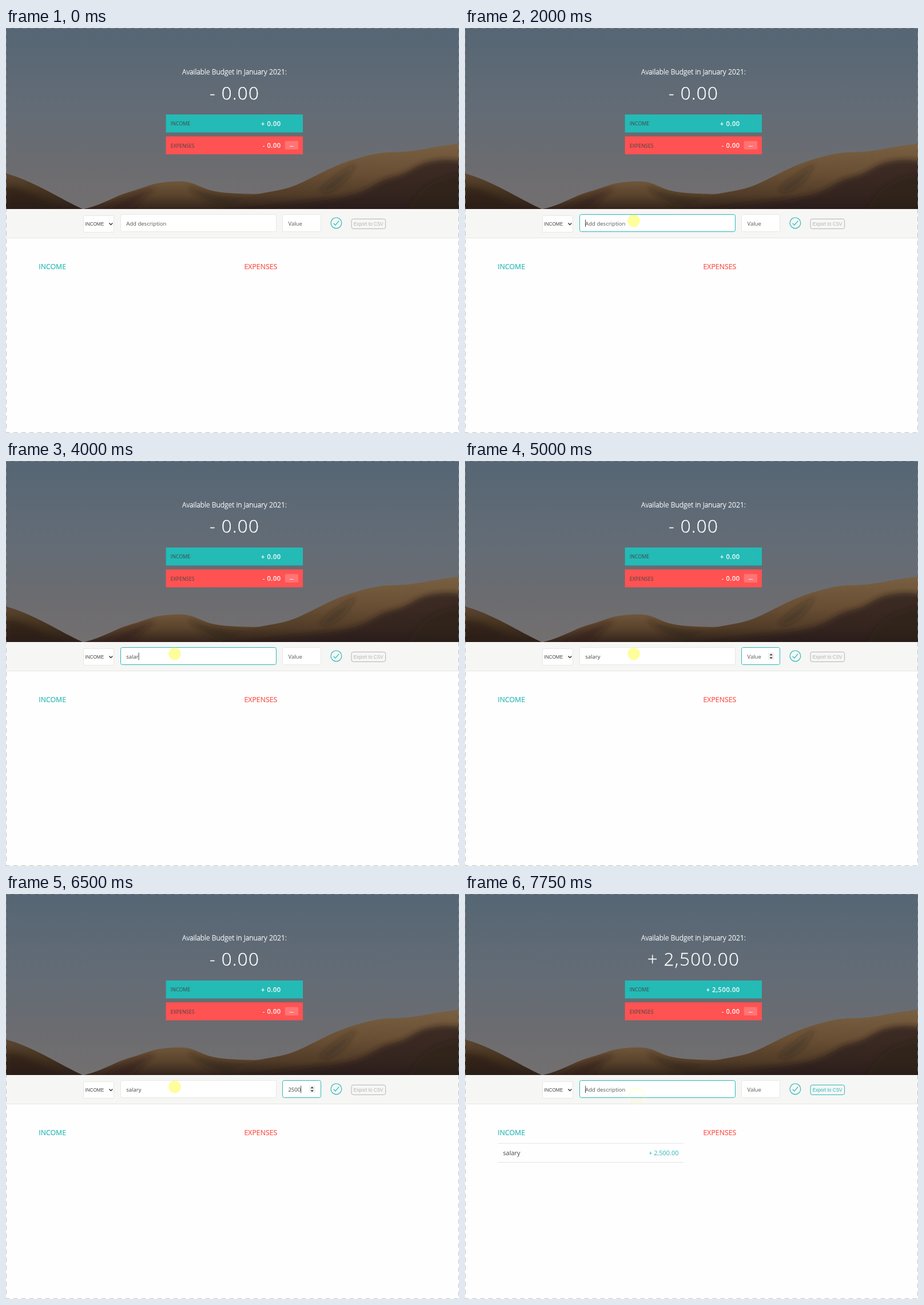
An HTML page for the animation above (8 s loop, 792 by 707 pixels).

```html
<!DOCTYPE html>
<html lang="en">
<head>
<meta charset="utf-8">
<title>Budget</title>
<style>
  html, body { margin: 0; width: 100%; height: 100%; overflow: hidden; background: #fefefe; }
  svg { display: block; width: 792px; height: 707px; }
  text { font-family: "Open Sans", sans-serif; font-size: 9.56px; fill: #444; white-space: pre; }
  .ui { font-family: "Liberation Sans", Arial, sans-serif; font-size: 8.2px; }
  .light { font-weight: 300; fill: #fff; text-anchor: middle; stroke: #fff; stroke-width: .3; }
  .title { font-size: 12.3px; }
  .big { font-size: 31.4px; letter-spacing: 1.37px; }
  .label { font-size: 8.88px; }
  .sum { font-size: 10.93px; letter-spacing: .68px; fill: #fff; text-anchor: end; stroke: #fff; stroke-width: .35; }
  .head { font-size: 12.35px; stroke-width: .2; }
  .row { font-size: 10.93px; }
  .teal { fill: #28b9b5; }
  .red { fill: #ff5049; }
  .head.teal { stroke: #28b9b5; }
  .head.red { stroke: #ff5049; }
  .field { fill: #fff; stroke: #e7e7e7; }
  .field.on { stroke: #28b9b5; }
  .hint { fill: #555; }
  .caret { stroke: #333; stroke-width: .9; }
  #export rect { fill: none; stroke: #b4b4b4; }
  #export text { fill: #b4b4b4; }
  #export.on rect { stroke: #28b9b5; }
  #export.on text { fill: #28b9b5; }
  .rule { stroke: #e4e4e4; }
</style>
</head>
<body>
<svg viewBox="0 0 792 707">
  <defs>
    <linearGradient id="sky" x1="0" y1="0" x2="0" y2="1">
      <stop offset="0" stop-color="#566674"/>
      <stop offset=".45" stop-color="#636c76"/>
      <stop offset=".75" stop-color="#6b6c70"/>
      <stop offset="1" stop-color="#736f70"/>
    </linearGradient>
    <linearGradient id="leftHill" x1="0" y1="0" x2="0" y2="1">
      <stop offset="0" stop-color="#5b4632"/>
      <stop offset=".5" stop-color="#45331f"/>
      <stop offset="1" stop-color="#2b1f1a"/>
    </linearGradient>
    <linearGradient id="midHill" x1="0" y1="0" x2="0" y2="1">
      <stop offset="0" stop-color="#6f563a"/>
      <stop offset=".5" stop-color="#5a432c"/>
      <stop offset="1" stop-color="#33241c"/>
    </linearGradient>
    <linearGradient id="rightHill" x1="0" y1="0" x2="0" y2="1">
      <stop offset="0" stop-color="#796042"/>
      <stop offset=".45" stop-color="#694f34"/>
      <stop offset=".78" stop-color="#523c28"/>
      <stop offset="1" stop-color="#2c1f19"/>
    </linearGradient>
    <filter id="soft" x="-20%" y="-40%" width="140%" height="180%"><feGaussianBlur stdDeviation="4"/></filter>
    <path id="left" d="M0 254C20 259 45 270 70 283S112 306 134 316H0Z"/>
    <path id="mid" d="M136 316C155 312 175 303 192 295S222 285 238 279S268 269 295 268S328 272 345 279S380 288 405 289S440 290 470 288V316Z"/>
    <path id="right" d="M376 316C400 306 420 294 440 290S485 283 505 275S550 253 572 243S615 227 640 221S685 218 708 215S760 205 792 202V316Z"/>
    <clipPath id="leftClip"><use href="#left"/></clipPath>
    <clipPath id="midClip"><use href="#mid"/></clipPath>
    <clipPath id="rightClip"><use href="#right"/></clipPath>
  </defs>

  <rect width="792" height="707" fill="#fefefe"/>
  <rect width="792" height="316" fill="url(#sky)"/>
  <use href="#left" fill="url(#leftHill)"/>
  <g clip-path="url(#leftClip)">
    <path d="M0 278C35 278 55 296 95 318H0Z" fill="#2a1e19" opacity=".6" filter="url(#soft)"/>
  </g>
  <use href="#mid" fill="url(#midHill)"/>
  <g clip-path="url(#midClip)" fill="#2a1e19" filter="url(#soft)">
    <path d="M318 276C345 292 400 294 470 302V320H385C360 304 335 296 318 276Z" opacity=".5"/>
    <path d="M185 309C215 288 240 284 262 280C240 294 230 308 215 320H170Z" opacity=".45"/>
  </g>
  <use href="#right" fill="url(#rightHill)"/>
  <g clip-path="url(#rightClip)" fill="#291c18" filter="url(#soft)">
    <path d="M410 322C500 306 560 302 600 292S650 265 676 260S715 239 738 234S770 229 800 232V325H410Z" opacity=".72"/>
    <path d="M548 284C566 264 590 248 612 237C600 258 590 276 560 288Z" opacity=".28"/>
    <path d="M700 325C715 285 740 262 800 252V325Z" opacity=".5"/>
  </g>

  <text class="light title" x="399.5" y="81">Available Budget in January 2021:</text>
  <text class="light big" id="total" x="399.5" y="125">- 0.00</text>
  <rect x="279.6" y="151" width="239.4" height="31.3" fill="#24bab6"/>
  <rect x="279.6" y="189.2" width="239.4" height="31.3" fill="#ff5252"/>
  <text class="label" x="287.8" y="170.3">INCOME</text>
  <text class="label" x="287.8" y="208.5">EXPENSES</text>
  <text class="sum" id="income" x="480.8" y="171">+ 0.00</text>
  <text class="sum" x="480.8" y="209.2">- 0.00</text>
  <rect x="487.7" y="197.3" width="23.3" height="14.6" rx="1.5" fill="#fff" fill-opacity=".2"/>
  <text class="light" x="499.3" y="208" style="font-size:7.5px;font-weight:400">---</text>

  <rect y="316" width="792" height="50.5" fill="#f6f6f5"/>
  <path class="rule" d="M0 366.5H792"/>
  <rect class="field" x="135.5" y="327.5" width="53" height="29" rx="1.5"/>
  <text class="ui" x="138.4" y="344.9">INCOME</text>
  <path d="M180.4 340.5L183.4 343.6L186.4 340.5" fill="none" stroke="#333" stroke-width="1.4"/>

  <rect class="field" id="descBox" x="200.5" y="325.5" width="272" height="30" rx="3"/>
  <text id="desc" x="210.2" y="344.6"></text>
  <rect class="field" id="valueBox" x="483.5" y="325.5" width="67" height="30" rx="3"/>
  <text id="value" x="493.4" y="344.6"></text>
  <g id="spin">
    <rect x="530" y="334.5" width="10.5" height="12.6" rx="1" fill="#f0f0f0"/>
    <path d="M532.5 339.2L535.2 336.2L537.9 339.2ZM532.5 342.4L535.2 345.4L537.9 342.4Z" fill="#3c3c3c"/>
  </g>
  <path class="caret" id="caret" d="M.4 334.6V347.4"/>

  <g fill="none" stroke="#28b9b5" stroke-width="1.2">
    <circle cx="577.4" cy="340.4" r="9.4"/>
    <path d="M572.8 341L575.9 344.1L582.2 336.7"/>
  </g>
  <g id="export">
    <rect x="604" y="333.4" width="59.6" height="17" rx="3.2"/>
    <text class="ui" x="607.7" y="344.9">Export to CSV</text>
  </g>

  <text class="head teal" x="57.2" y="421">INCOME</text>
  <text class="head red" x="416.4" y="421">EXPENSES</text>
  <g id="entry">
    <path class="rule" d="M57.5 435.3H382M57.5 468.5H382"/>
    <text class="row" x="66.4" y="456">salary</text>
    <text class="row teal" x="373.4" y="456" text-anchor="end">+ 2,500.00</text>
  </g>

  <circle id="ring" r="13.5" fill="#ffff99" fill-opacity=".06" stroke="#ffffa0" stroke-width="1.3"/>
  <circle id="disc" cx="295" cy="336.6" r="10.8" fill="#fefe9c"/>
  <rect x=".5" y=".5" width="791" height="706" fill="none" stroke="#9a9a9a" stroke-opacity=".6" stroke-dasharray="8 6"/>
</svg>
<script>
  const LOOP = 8000, TICK = 250;
  const FOCUS = 1750, TAB = 4500, SUBMIT = 7250, RELEASE = 7500;
  const typing = {
    desc: { word: "salary", keys: [3000, 3250, 3500, 3750, 4000, 4250], hint: "Add description" },
    value: { word: "2500", keys: [5500, 5750, 6000, 6250], hint: "Value" }
  };
  const $ = id => document.getElementById(id);
  const show = (id, on) => $(id).setAttribute("visibility", on ? "visible" : "hidden");
  const toggle = (id, on) => $(id).classList.toggle("on", on);

  function fill(id, t) {
    const { word, keys, hint } = typing[id];
    const typed = t < SUBMIT ? word.slice(0, keys.filter(k => k <= t).length) : "";
    $(id).textContent = typed || hint;
    $(id).classList.toggle("hint", !typed);
    return typed;
  }

  function placeCaret(id, typed, t) {
    // blinking restarts with every key press or change of focus
    const resets = [FOCUS, TAB, ...typing.desc.keys, ...typing.value.keys, SUBMIT];
    const last = Math.max(...resets.filter(k => k <= t));
    const on = t >= SUBMIT || (t - last) % 1000 < 500;
    show("caret", t >= FOCUS && on);
    const x = +$(id).getAttribute("x") + (typed ? $(id).getComputedTextLength() : 0);
    $("caret").setAttribute("transform", `translate(${x} 0)`);
  }

  function moveRing(t) {
    const arriving = t >= 250 && t < FOCUS, leaving = t >= RELEASE;
    show("ring", arriving || leaving);
    show("disc", t >= FOCUS && t < RELEASE);
    let x, y, alpha;
    if (leaving) {
      const p = (t - RELEASE) / 250;
      x = 297 + 3 * p; y = 344 + 9 * p; alpha = .55;
    } else {
      const p = Math.min(1, Math.max(0, (t - 250) / 1000));
      x = 292 + 2 * p; y = 304 + 41 * p * (2 - p); alpha = .5 - .2 * p;
    }
    $("ring").setAttribute("transform", `translate(${x} ${y})`);
    $("ring").setAttribute("opacity", alpha);
  }

  function draw(now) {
    const t = Math.floor(now % LOOP / TICK) * TICK;
    const done = t >= SUBMIT, onValue = t >= TAB && !done;
    const sum = "+ 2,500.00";
    $("total").textContent = done ? sum : "- 0.00";
    $("income").textContent = done ? sum : "+ 0.00";
    show("entry", done);
    toggle("export", done);
    toggle("descBox", t >= FOCUS && !onValue);
    toggle("valueBox", onValue);
    show("spin", onValue);
    const desc = fill("desc", t), value = fill("value", t);
    placeCaret(onValue ? "value" : "desc", onValue ? value : desc, t);
    moveRing(t);
  }

  const start = performance.now();
  function loop() {
    draw(performance.now() - start);
    requestAnimationFrame(loop);
  }
  loop();
</script>
</body>
</html>
```
